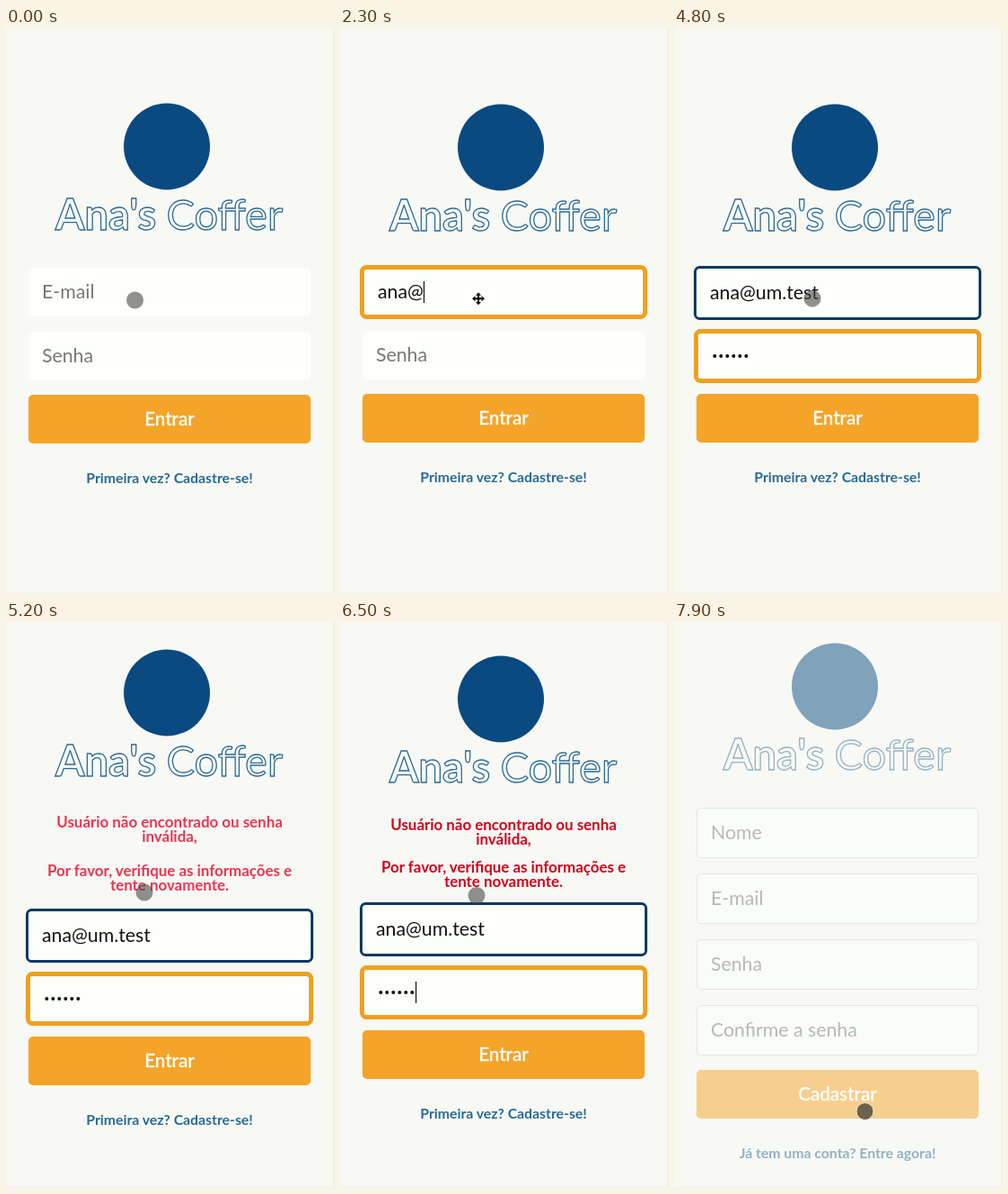
Write an HTML page that moves like this. It is 365x628 px and loops after 8000 ms.

```html
<!DOCTYPE html>
<html lang="pt-BR">
<head>
<meta charset="utf-8">
<title>Login</title>
<style>
  html, body { margin: 0; width: 100%; height: 100%; overflow: hidden; background: #f8f9f5; }
  svg { display: block; width: 100%; height: 100%; }
  text { font-family: Lato, "Open Sans", sans-serif; font-size: 21.3px; white-space: pre; }
  .mark { font-size: 47px; fill: none; stroke: #2a6a96; stroke-width: 1.3; }
  .hint { fill: #777873; }
  .typed { fill: #111; }
  .label { font-size: 20.6px; font-weight: 500; fill: #fff; stroke: #fff; stroke-width: .3; text-anchor: middle; }
  .link { font-size: 15.8px; font-weight: 700; fill: #276a94; text-anchor: middle; }
  .error { font-size: 16.9px; font-weight: 700; text-anchor: middle; }
  .field { fill: #fdfffb; }
</style>
</head>
<body>
<svg id="stage" viewBox="0 0 365 628" xmlns="http://www.w3.org/2000/svg"></svg>
<script>
const LOOP = 8000, STEP = 100;
const EMAIL = 'ana@um.test';
const NAVY = '#073a63', ORANGE = '#f0a01e';

// [time, characters shown]
const emailKeys = [[0, 0], [1700, 2], [2000, 3], [2300, 4], [2500, 5], [2600, 6], [3000, 8], [3200, 10], [3500, 11]];
const passKeys = [[0, 0], [3700, 1], [3800, 2], [3900, 3], [4100, 4], [4300, 6]];
const caretResets = [800, 3500, ...emailKeys.slice(1).map(k => k[0]), ...passKeys.slice(1).map(k => k[0])];

// [time, half of the height added by the message]
const spread = [[5100, 50], [5200, 54], [5300, 57], [5400, 58], [5500, 57], [5600, 56], [5800, 51], [5900, 48], [6000, 47]];
const pointerX = [[0, 143.5], [100, 149], [200, 154], [6400, 154], [6500, 152], [6700, 150], [6900, 166], [7100, 199], [7300, 216], [7400, 212.5]];
const pointerY = [[0, 302], [200, 300.5], [6400, 300], [6500, 303.5], [6700, 350], [6900, 432], [7100, 511], [7300, 541], [7400, 543]];

const stage = document.getElementById('stage');

function add(parent, tag, attrs = {}, text = '') {
  const el = document.createElementNS('http://www.w3.org/2000/svg', tag);
  set(el, attrs);
  if (text) el.textContent = text;
  return parent.appendChild(el);
}
function set(el, attrs) {
  for (const k in attrs) el.setAttribute(k, attrs[k]);
}
const show = (el, on) => set(el, { visibility: on ? 'visible' : 'hidden' });
const shift = (el, y, x = 0) => set(el, { transform: `translate(${x} ${y})` });
const held = (keys, t) => keys.filter(k => k[0] <= t).pop()[1];

function tween(keys, t) {
  const i = keys.findIndex(k => k[0] > t);
  if (i < 0) return keys[keys.length - 1][1];
  if (i === 0) return keys[0][1];
  const [t0, a] = keys[i - 1], [t1, b] = keys[i];
  return a + (b - a) * (t - t0) / (t1 - t0);
}

function makeLogo(parent) {
  const g = add(parent, 'g');
  add(g, 'circle', { cx: 179, cy: 131.5, r: 48, fill: '#0a4a80' });
  add(g, 'text', { class: 'mark', x: 55, y: 224, 'font-weight': 700 }, "Ana's");
  add(g, 'text', { class: 'mark', x: 308, y: 224, 'text-anchor': 'end' }, 'Coffer');
  return g;
}
function makeButton(parent, label) {
  const g = add(parent, 'g');
  add(g, 'rect', { x: 25, width: 314, height: 54, rx: 5, fill: '#f4a428' });
  add(g, 'text', { class: 'label', x: 182, y: 34 }, label);
  return g;
}
function makeField(parent, hint) {
  const g = add(parent, 'g');
  return {
    g,
    box: add(g, 'rect', { class: 'field' }),
    hint: add(g, 'text', { class: 'hint', y: 7 }, hint)
  };
}
function makeError(parent, lines) {
  const g = add(parent, 'g');
  lines.forEach((s, i) => add(g, 'text', { class: 'error', x: 182, y: 5.5 + 16 * i }, s));
  return g;
}

// border: 0 for an untouched field
function styleField(f, y, border, color) {
  const edge = border ? 22 + border / 2 : 25;
  const grow = border ? 60 - border : 54;
  shift(f.g, y);
  set(f.box, {
    x: edge, y: -grow / 2, width: 364 - 2 * edge, height: grow,
    rx: 5, stroke: color, 'stroke-width': border
  });
  set(f.hint, { x: color === ORANGE ? 42 : 40 });
}

// Login page
const login = add(stage, 'g');
const logo = makeLogo(login);
const errors = add(login, 'g');
const error1 = makeError(errors, ['Usuário não encontrado ou senha', 'inválida,']);
const error2 = makeError(errors, ['Por favor, verifique as informações e', 'tente novamente.']);
const email = makeField(login, 'E-mail');
const typed = add(email.g, 'text', { class: 'typed', y: 7 });
const pass = makeField(login, 'Senha');
const dots = Array.from({ length: 6 }, (_, i) =>
  add(pass.g, 'circle', { cx: 45.3 + 7 * i, cy: 0, r: 2, fill: '#111' }));
const enter = makeButton(login, 'Entrar');
const link = add(login, 'text', { class: 'link', x: 182, y: 5 }, 'Primeira vez? Cadastre-se!');
const caret = add(login, 'rect', { width: 1.2, height: 24, fill: '#111' });

// Sign-up page
const signup = add(stage, 'g');
shift(makeLogo(signup), -60);
['Nome', 'E-mail', 'Senha', 'Confirme a senha'].forEach((name, i) => {
  const f = makeField(signup, name);
  shift(f.g, 234 + 73 * i);
  set(f.box, { x: 25.5, y: -27.5, width: 313, height: 55, rx: 4, stroke: '#d2d3ce' });
  set(f.hint, { x: 41 });
});
shift(makeButton(signup, 'Cadastrar'), 497);
add(signup, 'text', { class: 'link', x: 182, y: 595 }, 'Já tem uma conta? Entre agora!');

add(stage, 'path', { d: 'M364.5 0V627.5M0 627H365', stroke: '#ececea', fill: 'none' });

// Pointer
const pointer = add(stage, 'g');
const disc = add(pointer, 'circle', { r: 9.5 });
const arm = 'M0-7L3-3.6H1V-1H3.6V-3L7 0L3.6 3V1H1V3.6H3L0 7L-3 3.6H-1V1H-3.6V3L-7 0L-3.6-3V-1H-1V-3.6H-3Z';
const mover = add(pointer, 'path', { d: arm, fill: '#000', stroke: '#fff', 'stroke-width': 1.4, 'paint-order': 'stroke' });

function drawLogin(t) {
  const onEmail = t >= 800 && t < 3500;
  const onPass = t >= 3500;
  const failed = t >= 5100;
  const d = failed ? Math.round(tween(spread, t)) : 0;

  shift(logo, (t >= 800 ? 1 : 0) - d);
  styleField(email, (onPass ? 294 : 293) + d, onPass ? 3 : onEmail ? 5 : 0, onPass ? NAVY : onEmail ? ORANGE : 'none');
  styleField(pass, (onEmail ? 363 : 364) + d, onPass ? 5 : 0, onPass ? ORANGE : 'none');
  shift(enter, (t >= 800 ? 406 : 407) + d);
  shift(link, (t >= 800 ? 499 : 500) + d);

  const letters = held(emailKeys, t);
  const count = held(passKeys, t);
  typed.textContent = EMAIL.slice(0, letters);
  set(typed, { x: onPass ? 40 : 42 });
  set(email.hint, { opacity: letters ? 0 : 1 });
  set(pass.hint, { opacity: count ? 0 : 1 });
  dots.forEach((dot, i) => set(dot, { opacity: i < count ? 1 : 0 }));

  const since = t - Math.max(...caretResets.filter(r => r <= t));
  const lit = t >= 800 && Math.floor(since / 500) % 2 === 0;
  const width = onPass ? 7 * count : letters ? typed.getComputedTextLength() : 0;
  set(caret, { x: 42 + width, y: (onPass ? 352 : 281) + d, opacity: lit ? 1 : 0 });

  const k = Math.min(1, Math.max(0, (t - 5200) / 300));
  const mix = (a, b) => Math.round(a + (b - a) * k);
  set(errors, {
    opacity: failed ? (t < 5200 ? .5 : 1) : 0,
    fill: `rgb(${mix(236, 208)},${mix(52, 2)},${mix(80, 27)})`
  });
  shift(error1, 222 - .55 * (d - 54));
  shift(error2, 276 + .45 * (d - 54));
}

function drawPointer(t) {
  const moving = (t >= 500 && t < 800) || (t >= 2300 && t < 2500);
  const pressed = t >= 7600;
  shift(pointer, tween(pointerY, t), tween(pointerX, t));
  show(disc, !moving);
  show(mover, moving);
  set(disc, pressed
    ? { fill: '#625c49', 'fill-opacity': .95, stroke: '#f3e6c8', 'stroke-width': 1 }
    : { fill: '#484848', 'fill-opacity': .6, stroke: 'none' });
}

function draw(time) {
  const t = Math.floor(time % LOOP / STEP) * STEP;
  const swapped = t >= 7600;
  set(login, { display: swapped ? 'none' : 'inline' });
  set(signup, { opacity: swapped ? (t - 7500) / 800 : 0 });
  if (!swapped) drawLogin(t);
  drawPointer(t);
}

const start = performance.now();
function tick() {
  draw(performance.now() - start);
  requestAnimationFrame(tick);
}
tick();
</script>
</body>
</html>
```
